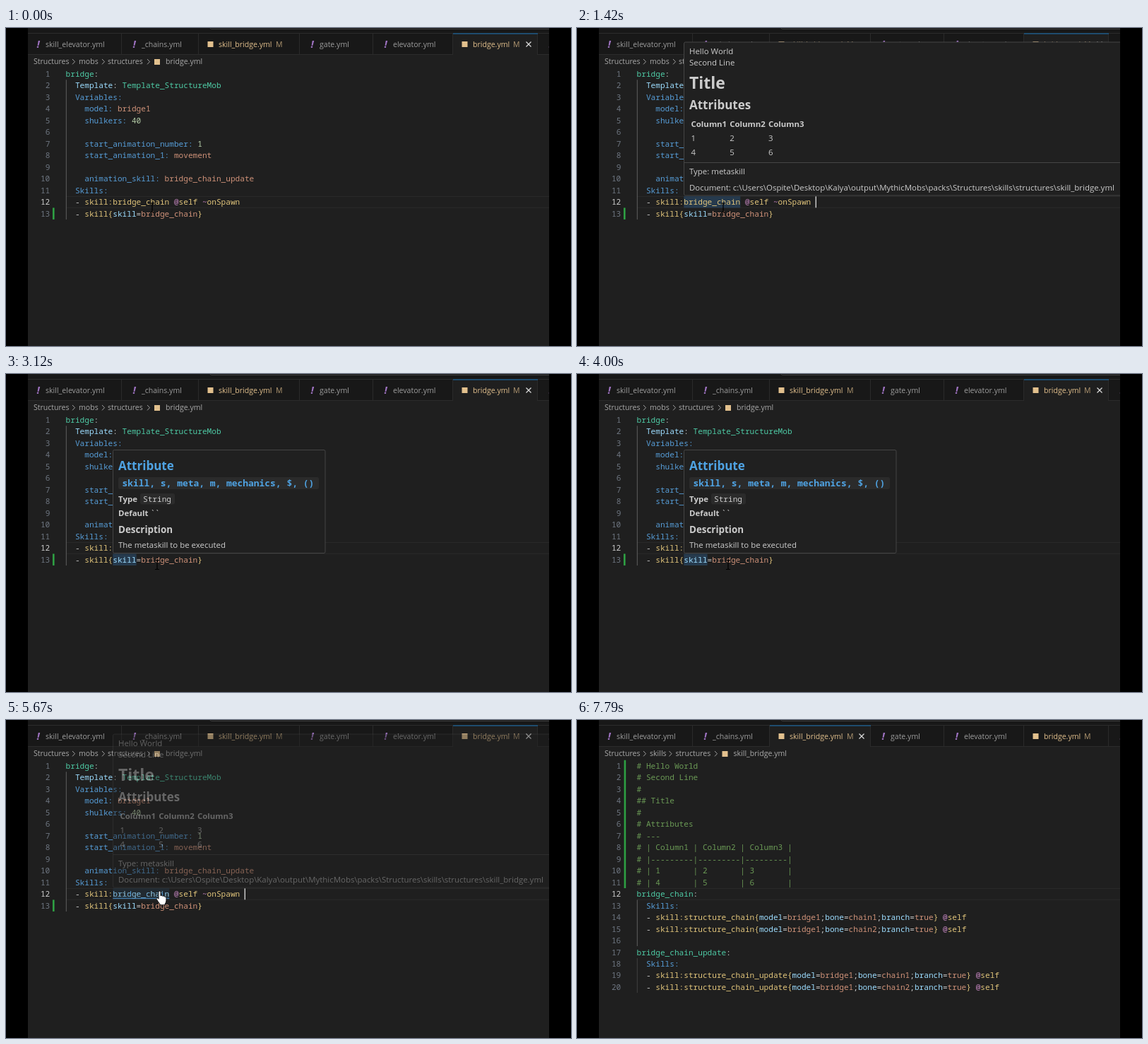
An HTML page for the animation above (7850 ms loop, 800 px wide and 450 px high).

```html
<!DOCTYPE html>
<html lang="en">
<head>
<meta charset="utf-8">
<title>Editor hovers</title>
<style>
  html, body { margin: 0; width: 100%; height: 100%; overflow: hidden; background: #000; }
  svg { display: block; width: 800px; height: 450px; }
  text { white-space: pre; font: 10.55px "Open Sans", "Noto Sans", sans-serif; }
  .code { font: 11.11px "Noto Sans Mono", "DejaVu Sans Mono", monospace; }
  .hover text { font-size: 11.45px; fill: #ccc; }
  .hover .bold { font-weight: 700; }
  .hover .mono { font: 700 11.11px "Noto Sans Mono", monospace; }
</style>
</head>
<body>
<svg id="stage" viewBox="0 0 800 450"></svg>
<script>
const LOOP = 7850, CHAR = 6.667, ROW = 16.47, LEFT = 84.6;
const OPEN = 6180; // the linked file opens
const COLORS = { t: '#4ec9a4', c: '#9cdcfe', b: '#569cd6', o: '#ce9178', n: '#b5cea8',
                 g: '#dfc37a', w: '#c8c8c8', p: '#c586c0', m: '#6a9955' };
const GOLD = '#e2c08d';

// Each segment begins with "^" and a colour letter.
const chainSkill = (name, n) =>
  `^w  - ^gskill:${name}{^cmodel^w=^obridge1^w;^cbone^w=^ochain${n}^w;^cbranch^w=^otrue^g} ^p@^gself`;
const field = (name, colour, value) => `^b    ${name}: ^${colour}${value}`;

const bridgeFile = [
  '^tbridge^w:',
  '^c  Template^w: ^tTemplate_StructureMob',
  '^b  Variables:',
  field('model', 'o', 'bridge1'),
  field('shulkers', 'n', '40'),
  '',
  field('start_animation_number', 'n', '1'),
  field('start_animation_1', 'o', 'movement'),
  '',
  field('animation_skill', 'o', 'bridge_chain_update'),
  '^b  Skills:',
  '^w  - ^gskill:bridge_chain ^p@^gself ^p~^gonSpawn',
  '^w  - ^gskill{^cskill^w=^obridge_chain^g}'
];

const skillFile = [
  ...['# Hello World', '# Second Line', '#', '## Title', '#', '# Attributes', '# ---',
    '# | Column1 | Column2 | Column3 |',
    '# |---------|---------|---------|',
    '# | 1       | 2       | 3       |',
    '# | 4       | 5       | 6       |'].map(s => '^m' + s),
  '^tbridge_chain^w:',
  '^b  Skills:',
  chainSkill('structure_chain', 1),
  chainSkill('structure_chain', 2),
  '',
  '^tbridge_chain_update^w:',
  '^b  Skills:',
  chainSkill('structure_chain_update', 1),
  chainSkill('structure_chain_update', 2)
];

const rect = (x, y, w, h, fill, extra = '') =>
  `<rect x="${x}" y="${y}" width="${w}" height="${h}" fill="${fill}" ${extra}/>`;
const text = (x, y, s, attrs = '') => `<text x="${x}" y="${y}" ${attrs}>${s}</text>`;
const stroke = (d, color, width = 1) =>
  `<path d="${d}" fill="none" stroke="${color}" stroke-width="${width}"/>`;
const fileMark = (x, y) => rect(x - 4, y - 4, 8, 8, GOLD);
const yamlMark = x => text(x - 2.5, 28, '!', 'style="font-size:15px;font-weight:700;font-style:italic" fill="#a074c4"');
const rowTop = n => 56.8 + (n - 1) * ROW;
const rowBase = n => 69 + (n - 1) * ROW;
const colX = n => LEFT + n * CHAR;

function codeLine(line, n) {
  const spans = line.split('^').slice(1)
    .map(s => `<tspan fill="${COLORS[s[0]]}">${s.slice(1)}</tspan>`).join('');
  const active = n === 12;
  return text(62.3, rowBase(n), n, `class="code" text-anchor="end" fill="${active ? '#ccc' : '#6e7681'}"`) +
    text(LEFT, rowBase(n), spans, 'class="code"');
}

const tabs = [
  { x: 28, end: 164, name: 'skill_elevator.yml' },
  { x: 164, end: 273, name: '_chains.yml' },
  { x: 273, end: 416, name: 'skill_bridge.yml', badge: 382 },
  { x: 416, end: 520, name: 'gate.yml' },
  { x: 520, end: 633, name: 'elevator.yml' },
  { x: 633, end: 753, name: 'bridge.yml', badge: 718 },
  { x: 753, end: 800, name: '' }
];

function tab({ x, end, name, badge }, current) {
  const on = name === current;
  let out = stroke(`M${end - .5} 8V37`, '#2b2b2b');
  if (on) out += rect(x, 8, end - x - 1, 30, '#1f1f1f') + rect(x, 7.5, end - x, 1, '#1874b8');
  out += badge ? fileMark(x + 16.5, 23) : yamlMark(x + 18);
  out += text(x + 28, 26.8, name, `fill="${badge ? GOLD : '#9d9d9d'}"`);
  if (badge) out += text(badge, 26.8, 'M', `fill="${GOLD}" opacity=".75"`);
  if (on) out += stroke(`M${end - 16.5} 19.5l7 7m0 -7l-7 7`, '#ddd', 1.2);
  return out;
}

function breadcrumb(folder, file, chevrons, folderX, fileX) {
  const y = 51.3, fill = 'fill="#a9a9a9"';
  return text(39, y, 'Structures', fill) + text(103, y, folder, fill) +
    text(folderX, y, 'structures', fill) + text(fileX, y, file, fill) +
    chevrons.map(x => stroke(`M${x - 2} 44l3.5 3.7l-3.5 3.7`, '#a0a0a0')).join('') +
    fileMark(fileX - 12, 48);
}

function view(id, current, crumbs, decoration, lines) {
  return `<g id="${id}">` + tabs.map(t => tab(t, current)).join('') + crumbs +
    stroke('M85 238.4H769M85 254.2H769', '#2b2b2b') + decoration +
    lines.map((l, i) => codeLine(l, i + 1)).join('') + '</g>';
}

const popupFrame = (y, w, h) =>
  rect(151.5, y, w, h, '#202020', 'rx="2" stroke="#454545"');
const bold = (x, y, s, size = 11.45, fill = '#ccc') =>
  text(x, y, s, `class="bold" style="font-size:${size}px;fill:${fill}"`);
const tableRow = (y, cells, draw = text) => cells.map((c, i) => draw(161.5 + i * 54.7, y, c)).join('');

const skillPopup = `<g id="skillPopup" class="hover">` + popupFrame(20, 640, 217) +
  text(159, 37, 'Hello World') + text(159, 53.2, 'Second Line') +
  bold(159, 86, 'Title', 23) + bold(159, 114.6, 'Attributes', 17) +
  tableRow(140, ['Column1', 'Column2', 'Column3'], bold) +
  tableRow(160, [1, 2, 3]) + tableRow(180, [4, 5, 6]) +
  stroke('M152 190.5H769', '#454545') +
  text(159, 207, 'Type: metaskill') +
  text(159, 230, 'Document: c:\\Users\\Ospite\\Desktop\\Kalya\\output\\MythicMobs\\packs\\Structures\\skills\\structures\\skill_bridge.yml') +
  '</g>';

const attributePopup = `<g id="attributePopup" class="hover">` + popupFrame(107.5, 300.5, 146) +
  bold(159, 135.6, 'Attribute', 17, '#4fa3e3') +
  rect(159, 146, 284, 17, '#2b2b2b', 'rx="3"') +
  text(164.5, 159, 'skill, s, meta, m, mechanics, $, ()', 'class="mono" style="font-size:12.95px;fill:#4fa3e3"') +
  bold(159, 181, 'Type') + rect(190, 169, 49, 15.5, '#2b2b2b', 'rx="3"') +
  text(194, 181, 'String', 'class="mono" style="font-weight:500"') +
  bold(159, 201.3, 'Default') + text(204.5, 201.3, '``') +
  bold(159, 224.8, 'Description', 13.4) +
  text(159, 246.3, 'The metaskill to be executed') + '</g>';

const wordMark = (id, col, len, row, fill) =>
  rect(colX(col), rowTop(row), len * CHAR, ROW, fill, `id="${id}"`);

stage.innerHTML =
  '<clipPath id="screen"><rect x="31" width="738" height="450"/></clipPath><g clip-path="url(#screen)">' +
  rect(31, 0, 738, 450, '#1f1f1f') + rect(31, 0, 738, 37.5, '#181818') +
  stroke('M288 -3Q288 1.5 292 1.5H800', '#3c3c3c') +
  stroke('M31 7.5H769M31 37.5H769', '#2b2b2b') +
  view('bridgeView', 'bridge.yml',
    breadcrumb('mobs', 'bridge.yml', [96, 138, 202], 144, 226),
    stroke('M85.3 73.3V271', '#606060') + rect(66, rowTop(13), 2.6, ROW, '#2ea043') +
    wordMark('chainMark', 10, 12, 12, '#263a4d') + wordMark('keyMark', 10, 5, 13, '#263a4d'),
    bridgeFile) +
  view('skillView', 'skill_bridge.yml',
    breadcrumb('skills', 'skill_bridge.yml', [96, 132.5, 197], 139.5, 221.5),
    stroke('M85.3 254.5V320', '#606060') + stroke('M85.3 337V386', '#404040') +
    rect(66.6, rowTop(1), 2.6, 11 * ROW, '#2ea043') + wordMark('openedMark', 0, 12, 12, '#633519'),
    skillFile) +
  `<g id="link">${text(colX(10), rowBase(12), 'bridge_chain', 'class="code" fill="#4e94ce"')}` +
  stroke(`M${colX(10)} 252.3h${12 * CHAR}`, '#4e94ce') + '</g>' +
  rect(0, 238.3, 1.4, 16, '#d0d0d0', 'id="caret"') +
  skillPopup + attributePopup +
  '<g id="mouse">' +
  `<g id="beam">${stroke('M-3 -6.5h2.2l.8 .8l.8 -.8h2.2M0 -6V6M-3 6.5h2.2l.8 -.8l.8 .8h2.2', '#000', 1.2)}</g>` +
  '<path id="hand" fill="#fff" stroke="#111" stroke-width=".9" d="M-3.4 -6.3q0 -1.6 1.4 -1.6t1.4 1.6v5q2.3 -.9 3 .5q2 -.5 2.6 .8q2.4 -.2 2.4 1.7v3.6q0 3 -1.8 4.8v1.6h-7.2v-1.5q-2.4 -2.6 -4.6 -6.5q-.6 -1.5 .6 -1.9q1.2 -.3 2.2 1.4z"/>' +
  '</g></g>';

const $ = id => document.getElementById(id);
const show = (id, opacity) => $(id).setAttribute('opacity', +opacity);
const clamp = v => Math.max(0, Math.min(1, v));
const during = (t, from, to) => t >= from && t < to;
const popup = (t, from, to) => t < to ? clamp((t - from + 10) / 100) : 0;

// Pointer moves: start, end, then the position reached.
const moves = [[0, 0, 207, 254.5], [2300, 2560, 214, 270], [4000, 4270, 312, 264.5], [5000, 5320, 219.5, 250]];

function pointer(t) {
  let x = 0, y = 0;
  for (const [from, to, nextX, nextY] of moves) {
    if (t < from) break;
    const k = to > from ? clamp((t - from) / (to - from)) : 1;
    const eased = k * k * (3 - 2 * k);
    x += (nextX - x) * eased;
    y += (nextY - y) * eased;
  }
  return [x, y];
}

function draw(t) {
  const opened = t >= OPEN;
  const linked = during(t, 5400, OPEN);
  const chain = Math.max(popup(t, 240, 2400), popup(t, 5640, OPEN));
  const attribute = popup(t, 2750, 4520);
  show('bridgeView', !opened);
  show('skillView', opened);
  show('skillPopup', chain);
  show('attributePopup', attribute);
  show('chainMark', chain);
  show('keyMark', attribute);
  show('openedMark', t < OPEN + 370);
  show('link', linked);

  // The blink restarts when the file opens.
  const phase = opened ? t - OPEN : t - 240;
  show('caret', phase >= 0 && phase % 1000 < 500);
  $('caret').setAttribute('x', opened ? 84.6 : 337.6);

  show('mouse', t < 7760);
  show('hand', linked);
  show('beam', !linked);
  $('mouse').setAttribute('transform', `translate(${pointer(t)})`);
}

const start = performance.now();
function tick() {
  draw((performance.now() - start) % LOOP);
  requestAnimationFrame(tick);
}
tick();
</script>
</body>
</html>
```
